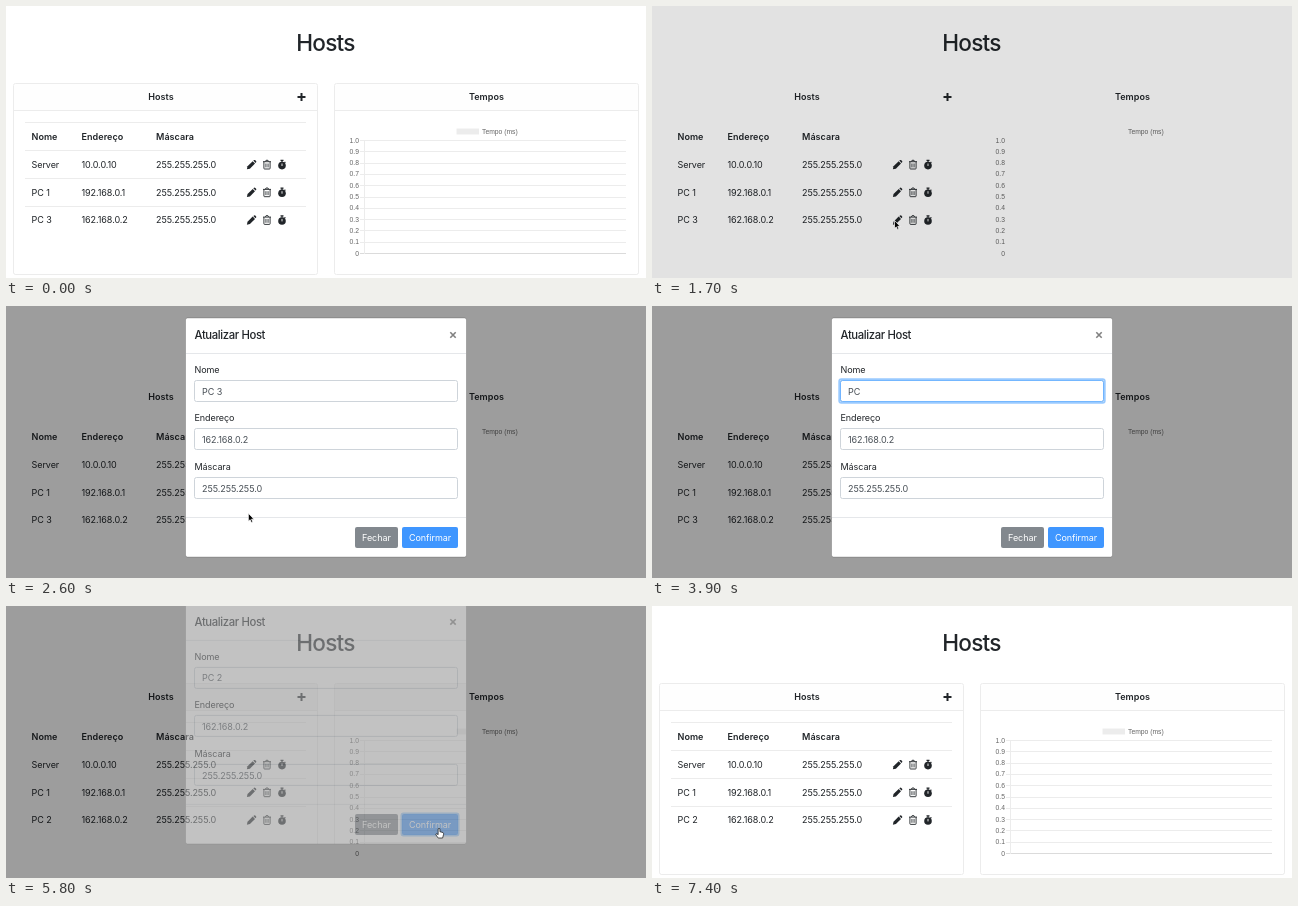
Recreate the animation shown at these times as an HTML page. Size 640 by 272 pixels, loop 7.5 s.

```html
<!DOCTYPE html>
<html lang="pt">
<head>
<meta charset="utf-8">
<title>Hosts</title>
<style>
  html, body { margin: 0; width: 640px; height: 272px; overflow: hidden; background: #fff; }
  svg { display: block; }
  text { font: 9.04px Inter, sans-serif; letter-spacing: -.01em; fill: #212529; white-space: pre; }
  .bold { font-weight: 600; letter-spacing: .005em; }
  .title { font-size: 22.6px; font-weight: 500; letter-spacing: -.035em; }
  .heading { font-size: 11.3px; font-weight: 500; letter-spacing: -.033em; }
  .chart { font: 6.75px "Liberation Sans", Arial, sans-serif; letter-spacing: 0; fill: #666; }
  .mid { text-anchor: middle; }
  .end { text-anchor: end; }
  .value { fill: #495057; }
  .light { fill: #fff; }
  .field { fill: #fff; stroke: #ced4da; }
  .ring { fill: none; stroke: #007bff; stroke-opacity: .4; stroke-width: 2; }
</style>
</head>
<body>
<svg id="stage" width="640" height="272" viewBox="0 0 640 272">
  <defs>
    <clipPath id="behind"><rect id="behindBox" x="180" width="280" height="239"/></clipPath>
    <g id="pencil" fill="#212529">
      <path d="M-4.6 4.6L-4 1.6 1.2-3.5 3.5-1.2-1.6 4Z"/>
      <path d="M1.8-4.1L2.6-4.7Q3.2-5 3.8-4.5L4.6-3.7Q5-3.1 4.6-2.5L4-1.8Z"/>
    </g>
    <g id="trash" fill="none" stroke="#212529" stroke-width=".9">
      <path d="M-4-3H4M-1.6-3.2L-1-4.4H1L1.6-3.2M-3.1-3V3.6Q-3.1 4.3-2.4 4.3H2.4Q3.1 4.3 3.1 3.6V-3"/>
      <path d="M-1.3-1.2V2.7M0-1.2V2.7M1.3-1.2V2.7" stroke-width=".6"/>
    </g>
    <g id="watch" stroke="#212529">
      <circle cy=".9" r="3.8" fill="#212529" stroke="none"/>
      <path d="M-1.5-4.3H1.5M0-4.3V-2.5M2.4-1.8L3.4-2.7" stroke-width="1.2"/>
      <path d="M0-1.2V1.3" stroke="#fff" stroke-width=".9"/>
    </g>
  </defs>
  <g id="lines" stroke="#dadada" fill="none"></g>
  <g id="page"></g>
  <rect id="backdrop" width="640" height="272"/>
  <g id="modal"></g>
  <g id="pointer" stroke="#fff" stroke-width=".7" stroke-linejoin="round">
    <path id="arrow" d="M0 0V8L1.8 6.4 3 9.2 4.4 8.6 3.2 5.8H5.6Z"/>
    <path id="hand" fill="#fff" stroke="#111" d="M-.9 .3Q0-.7 .9 .3V3.2L4 4Q4.8 4.4 4.5 6L3.6 9.5H-.8L-3.2 6.2Q-3.2 5-2.1 5.2L-.9 6.2Z"/>
    <path id="beam" fill="none" stroke="#222" d="M-1.6-4Q0-4 0-3V3Q0 4-1.6 4M1.6-4Q0-4 0-3M1.6 4Q0 4 0 3"/>
  </g>
</svg>
<script>
const $ = id => document.getElementById(id);
const text = (x, y, str, cls = '', id = '') =>
  `<text x="${x}" y="${y}" class="${cls}" id="${id}">${str}</text>`;
const path = (d, more = '') => `<path d="${d}" ${more}/>`;
const box = (x, y, w, h, more = '') =>
  `<rect x="${x}" y="${y}" width="${w}" height="${h}" rx="2" ${more}/>`;
const clamp = v => Math.max(0, Math.min(1, v));

const chartY = i => 134.5 + i * 11.3;
const columns = [25.5, 75.5, 150];
const rows = [
  ['Server', '10.0.0.10', '255.255.255.0'],
  ['PC 1', '192.168.0.1', '255.255.255.0'],
  ['PC 3', '162.168.0.2', '255.255.255.0'],
];

function buildPage() {
  let lines = '<g id="heads">', page = text(319.5, 45, 'Hosts', 'title mid');
  for (const x of [7.5, 328.5]) lines += box(x, 77.5, 304, 27, 'fill="#f0f0f0" stroke="none"');
  lines += '</g>';
  for (const x of [7.5, 328.5]) lines += box(x, 77.5, 304, 191) + path(`M${x} 104.5h304`);
  for (const y of [116.5, 144.5, 172.5, 200.5]) lines += path(`M19 ${y}H300`);
  for (let i = 0; i <= 10; i++) {
    const y = chartY(i), label = i == 10 ? '0' : (1 - i / 10).toFixed(1);
    lines += path(`M354 ${Math.floor(y) + .5}H620`, i == 10 ? 'stroke="#b8b8b8"' : '');
    page += text(353, y + 2, label, 'chart end');
  }
  lines += path('M358.5 134V248') + '<path d="M450.5 125.5h22.5" stroke-width="6"/>';

  page += text(155, 94.3, 'Hosts', 'bold mid') + text(480.5, 94.3, 'Tempos', 'bold mid')
    + text(476, 127.8, 'Tempo (ms)', 'chart')
    + path('M291.5 91h8M295.5 87v8', 'stroke="#212529" stroke-width="2"');
  ['Nome', 'Endereço', 'Máscara'].forEach((s, c) => page += text(columns[c], 134, s, 'bold'));
  rows.forEach((row, r) => {
    const y = 158.7 + r * 27.7;
    row.forEach((s, c) => page += text(columns[c], y + 3.3, s, '', `cell${r}${c}`));
    ['pencil', 'trash', 'watch'].forEach((icon, i) =>
      page += `<use href="#${icon}" x="${[245.5, 261, 276][i]}" y="${y}"/>`);
  });
  $('lines').innerHTML = lines;
  $('page').innerHTML = page;
}

function buildModal() {
  let m = box(179.5, 12, 281, 239, 'fill="#fff" stroke="#000" stroke-opacity=".2"')
    + text(188.5, 33.2, 'Atualizar Host', 'heading')
    + path('M444.3 26.3l5.4 5.4m0-5.4l-5.4 5.4', 'stroke="#808080" stroke-width="1.6"')
    + path('M180 47.5H460M180 211.5H460', 'stroke="#e5e7ea"');
  ['Nome', 'Endereço', 'Máscara'].forEach((label, i) => {
    const y = i * 48.6;
    m += text(188.5, 66.8 + y, label)
      + box(188.5, Math.floor(74 + y) + .5, 263, 21, 'class="field"')
      + text(196, 88.5 + y, rows[2][i], 'value', 'value' + i);
  });
  m += `<g id="inputFocus">${box(188.5, 74.5, 263, 21, 'fill="none" stroke="#80bdff"')
      + box(187.3, 73.3, 265.4, 23.4, 'class="ring"')}</g>`
    + box(349, 221, 43, 21, 'fill="#82888e"') + text(370.4, 234.8, 'Fechar', 'light mid')
    + box(396, 221, 56, 21, 'fill="#3f96ff"') + text(424, 234.8, 'Confirmar', 'light mid')
    + `<g id="buttonFocus">${box(395.5, 220.5, 57, 22, 'class="ring"')}</g>`;
  $('modal').innerHTML = m;
}

// time, x, y
const track = [
  [100, 268, 233], [500, 246, 216], [700, 246, 216], [1100, 242.5, 214.5], [2500, 242.5, 214.5],
  [3200, 240, 85], [4400, 240, 85], [5200, 433.5, 223], [5900, 433, 222.5], [6000, 433, 222.5],
  [6300, 38, 212], [7000, 38, 212], [7400, 256, 280],
];

function pointerAt(t) {
  const i = track.findIndex(k => k[0] > t);
  if (i < 1) return track[i < 0 ? track.length - 1 : 0].slice(1);
  const [a, b] = [track[i - 1], track[i]], p = (t - a[0]) / (b[0] - a[0]);
  const e = p * p * (3 - 2 * p);
  return [1, 2].map(c => a[c] + (b[c] - a[c]) * e);
}

const show = (id, on) => $(id).style.display = on ? '' : 'none';
const easeOut = p => 1 - (1 - p) ** 1.7;
const opens = 1825, closes = 5707;

function draw(t) {
  const dim = .385 * (clamp((t - 1655) / 150) - clamp((t - 5845) / 150));
  const fade = clamp((t - opens) / 150) - clamp((t - closes) / 150);
  const shift = -28 * (t < closes
    ? 1 - easeOut(clamp((t - opens) / 300))
    : easeOut(clamp((t - closes) / 300)));
  $('backdrop').setAttribute('opacity', dim);
  $('modal').setAttribute('opacity', fade);
  $('modal').setAttribute('transform', `translate(0 ${shift})`);

  // While dimmed, hairlines show only behind the dialog; afterwards they return strong, then soften.
  const dimmed = dim > .01, strong = t >= 5900 && t < 6200;
  show('lines', !dimmed || fade > 0);
  $('behindBox').setAttribute('y', 12 + shift);
  $('lines').setAttribute('clip-path', dimmed ? 'url(#behind)' : 'none');
  $('lines').setAttribute('opacity', strong ? 1 : .5);
  $('heads').setAttribute('opacity', strong || dimmed ? 1 : .2);

  $('value0').textContent = t < 3700 ? 'PC 3' : t < 4200 ? 'PC ' : 'PC 2';
  $('cell20').textContent = t < 5600 ? 'PC 3' : 'PC 2';
  show('inputFocus', t >= 3200 && t < 5400);
  show('buttonFocus', t >= 5400);

  const [x, y] = pointerAt(t);
  const dialog = t > 2100 && t < 5900;
  const beam = dialog && x < 452 && y > 74 && y < 96 || t >= 6300 && t <= 7000;
  const hand = dialog && x > 396 && y > 221;
  show('pointer', t >= 100 && t < 3600 || t >= 4500 && t < 7400);
  show('beam', beam);
  show('hand', hand);
  show('arrow', !beam && !hand);
  $('pointer').setAttribute('transform', `translate(${x} ${y})`);
}

buildPage();
buildModal();
const start = performance.now();
function tick() {
  const t = (performance.now() - start) % 7500;
  draw(Math.floor(t / 100) * 100); // ten steps a second
  requestAnimationFrame(tick);
}
tick();
</script>
</body>
</html>
```
